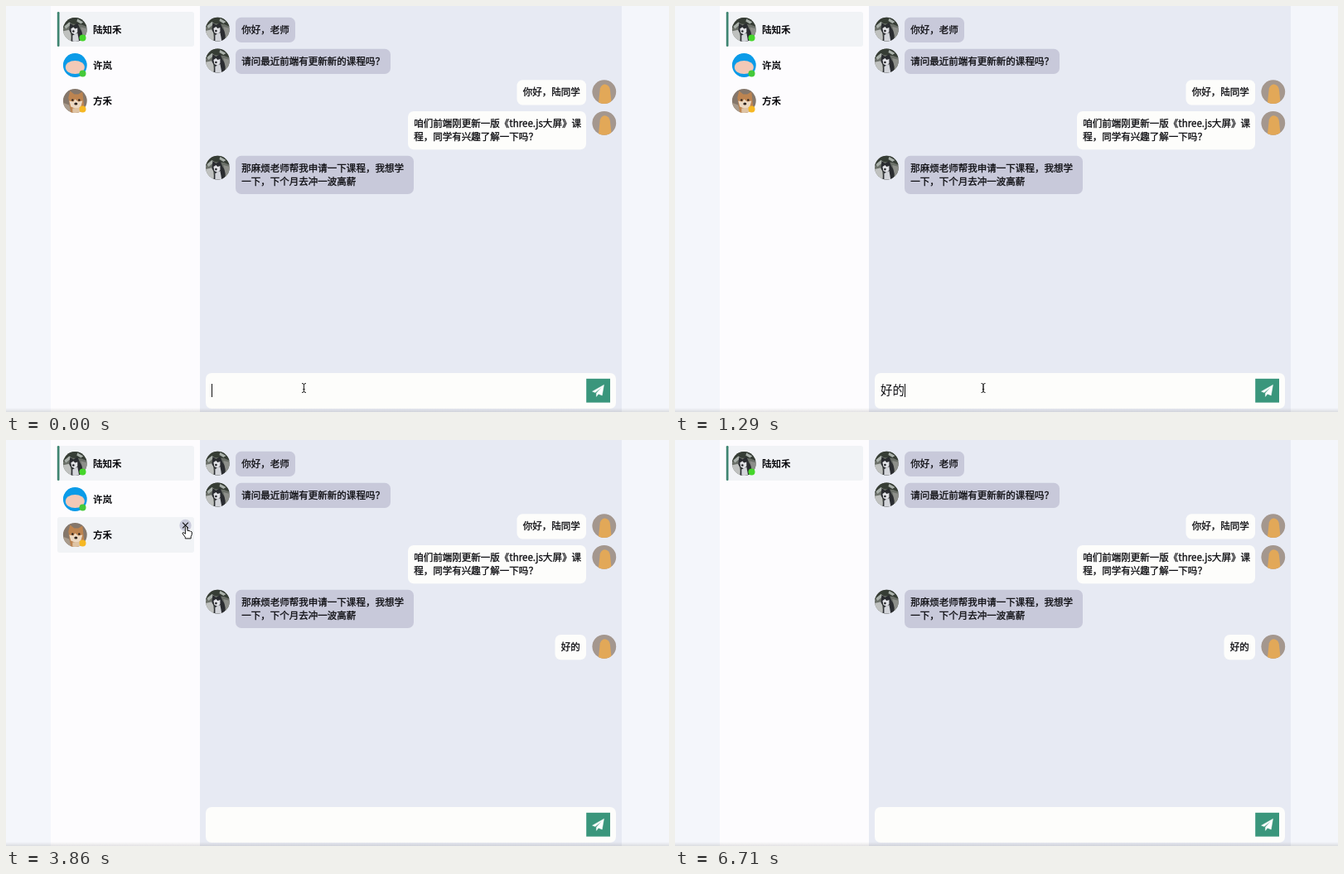
Recreate the animation shown at these times as an HTML page. Size 800 px wide and 490 px high, loop 6.85 s.

```html
<!DOCTYPE html>
<html lang="zh-CN">
<head>
<meta charset="utf-8">
<title>Chat</title>
<style>
html, body { margin: 0; width: 100%; height: 100%; overflow: hidden; background: #f4f6fb; }
svg { display: block; width: 800px; height: 490px; }
text { font: 500 11.52px "Noto Sans CJK SC", "Noto Sans CJK", sans-serif; fill: #0c0c10; white-space: pre; }
.msg { stroke: #0c0c10; stroke-width: .3; }
.name { font-weight: 700; }
#draft { font-family: "Liberation Sans", "Noto Sans CJK SC", sans-serif; font-size: 14.4px; font-weight: 400; }
</style>
</head>
<body>
<svg viewBox="0 0 800 490">
  <defs>
    <clipPath id="disc"><circle r="14.4"/></clipPath>
    <linearGradient id="edge" x2="0" y2="1">
      <stop offset="0" stop-color="#777" stop-opacity="0"/>
      <stop offset="1" stop-color="#777" stop-opacity=".2"/>
    </linearGradient>
    <g id="husky" clip-path="url(#disc)">
      <circle r="15" fill="#6b7069"/>
      <path d="M-15 -15H15V-3L8 -6L-4 -7L-15 -2Z" fill="#363d35"/>
      <path d="M-13 -4L-7 -9L-4 -7L-11 -1ZM3 -13L10 -9L7 -7L2 -10Z" fill="#a9b0aa"/>
      <path d="M-15 2L-6 0L-4 15H-15Z" fill="#bfc1bf"/>
      <path d="M-7 1L-6 -8L-2 -5L3 -8L6 -1L10 5L8 15H-5L-4 6Z" fill="#2a2c30"/>
      <path d="M-5 -1L-2 -3L0 -1L3 -2L3 3L0 6L-4 4Z" fill="#e0e1e5"/>
      <path d="M-3 7L3 4L5 15H-3Z" fill="#d3d5da"/>
      <circle cx="-2" cy="2" r="1.3" fill="#222428"/>
      <path d="M7 -3L15 -1V9L10 11Z" fill="#8d8f8a"/>
    </g>
    <g id="boy" clip-path="url(#disc)">
      <circle r="15" fill="#0b9be8"/>
      <ellipse cy="2.5" rx="11.5" ry="8" fill="#f3c9b7"/>
    </g>
    <g id="shiba" clip-path="url(#disc)">
      <circle r="15" fill="#85776b"/>
      <path d="M-15 2L-7 5L-4 15H-15Z" fill="#a99b8c"/>
      <path d="M-8 -4L-6 -12L-1 -8H4L9 -11L10 -2L12 15H-5Z" fill="#bd8450"/>
      <path d="M-7 0L-2 1L0 -2L4 1L9 0L7 7L2 10L-5 7Z" fill="#ecd9c3"/>
      <path d="M-3 9L8 8L10 15H-3Z" fill="#dfc4a5"/>
      <circle cx="-3" cy="-1" r="1.2" fill="#2b211c"/>
      <circle cx="5" cy="-1" r="1.2" fill="#2b211c"/>
      <ellipse cx="1" cy="3.5" rx="2" ry="1.5" fill="#2b211c"/>
    </g>
    <g id="teacher" clip-path="url(#disc)">
      <circle r="15" fill="#a4978e"/>
      <path d="M-7 15L-5 -4Q-3 -9 1 -9Q6 -8 7 -3L9 15Z" fill="#e2a858"/>
    </g>
  </defs>

  <rect width="800" height="490" fill="#f4f6fb"/>
  <rect x="54" width="180" height="490" fill="#fdfcfe"/>
  <rect x="234" width="509" height="490" fill="#e7eaf3"/>
  <g id="side"></g>
  <g id="chat"></g>
  <rect x="241" y="443" width="495" height="43" rx="7" fill="#fdfdfb"/>
  <text id="draft" x="248" y="469"></text>
  <rect id="line" x="248" y="471" height="1" fill="#111"/>
  <rect id="caret" y="456" width="1" height="16" fill="#111"/>
  <rect x="700.2" y="449.8" width="28.8" height="28.8" fill="#3a967c"/>
  <path d="M721.5 457.2L719.3 470L714.9 468.2L712.4 471.4V467.3L718.9 459.9L710.9 466.6L707.5 465.2Z" fill="#fff" stroke="#fff" stroke-width=".4" stroke-linejoin="round"/>
  <rect y="485" width="800" height="5" fill="url(#edge)"/>

  <g id="pointer">
    <path id="arrow" d="M0 0V9.2L2.1 7.3L3.6 10.6L5.2 9.9L3.8 6.7H6.7Z" fill="#000" stroke="#fff" stroke-width=".9" paint-order="stroke"/>
    <path id="hand" d="M-1.2 .6Q0 -.8 1.1 .6L1.5 5Q2.6 4 3.5 5.4Q4.7 4.6 5.4 6Q6.8 5.6 6.9 7.4Q6.9 10.5 5.6 12.2V14.4H-1.2V12.8L-4.4 8.4Q-4.6 6.8 -3 7.2L-1.1 8.8Z" fill="#fff" stroke="#111" stroke-width="1" stroke-linejoin="round"/>
    <path id="beam" d="M-2.5 -5.5Q0 -5.5 0 -4V4Q0 5.5 -2.5 5.5M2.5 -5.5Q0 -5.5 0 -4V4Q0 5.5 2.5 5.5M-1.2 1.5H1.2" fill="none" stroke="#222" stroke-width="1"/>
  </g>
</svg>
<script>
const LOOP = 6850, FPS = 7, LAST = 47, SENT = 14;
const $ = id => document.getElementById(id);
const show = (el, on) => { el.style.display = on ? '' : 'none'; };

// name, avatar, status colour, step at which the contact is removed
const contacts = [
  ['陆知禾', 'husky', '#45d62b', Infinity],
  ['许岚', 'boy', '#45c93a', 39],
  ['方禾', 'shiba', '#f6b824', 31]
];

// top, from the teacher, width, lines
const messages = [
  [13.8, false, 72, ['你好，老师']],
  [51.7, false, 187, ['请问最近前端有更新新的课程吗？']],
  [89.3, true, 83.5, ['你好，陆同学']],
  [127, true, 215, ['咱们前端刚更新一版《three.js大屏》课', '程，同学有兴趣了解一下吗？']],
  [180.8, false, 215, ['那麻烦老师帮我申请一下课程，我想学', '一下，下个月去冲一波高薪']],
  [235, true, 37.5, ['好的']]
];

const typed = ['', 'h', 'hao', 'hao d', 'hao de', 'hao de'];

// pointer path: step, x, y
const path = [
  [0, 359.5, 461], [9, 372, 461], [10, 560, 458], [11, 735, 458], [12, 714, 463],
  [13, 711, 464.5], [15, 711, 464.5], [16, 655, 450], [17, 540, 372], [19, 262, 140],
  [20, 180, 88], [21, 150, 74.5], [22, 160, 86], [24, 214, 102], [25, 217.5, 104.5],
  [33, 217.5, 104.5], [34, 217, 96], [37, 217, 62], [38, 216.5, 60.5], [47, 216.5, 60.5]
];

const rowTop = i => 7 + 43 * i;
const avatar = (id, x, y) => `<use href="#${id}" transform="translate(${x} ${y})"/>`;

$('side').innerHTML = contacts.map(([name, pic, dot], i) => {
  const y = rowTop(i), mid = y + 21.5;
  return `<g>
    <rect class="back" x="62" y="${y}" width="165" height="${i ? 43 : 42}" rx="3" fill="#f1f3f6"/>
    ${i ? '' : `<rect x="61.8" y="${y}" width="2.7" height="42" rx="1.3" fill="#3f8571"/>`}
    ${avatar(pic, 83.3, mid)}
    <circle cx="92.5" cy="${mid + 10}" r="4" fill="${dot}"/>
    <text class="name" x="105" y="${mid + 4.2}">${name}</text>
    <g class="close" transform="translate(216.5 ${y + 10})">
      <circle r="7.2" fill="#c9cadb"/>
      <path d="M-3.4 -3.4L3.4 3.4M3.4 -3.4L-3.4 3.4" stroke="#111" stroke-width="1.1"/>
    </g>
  </g>`;
}).join('');

$('chat').innerHTML = messages.map(([y, mine, w, lines]) => {
  const x = mine ? 700 - w : 277, h = 14.3 + 16 * lines.length;
  return `<g>
    ${avatar(mine ? 'teacher' : 'husky', mine ? 721.8 : 255.4, y + 14.3)}
    <rect x="${x}" y="${y}" width="${w}" height="${h}" rx="7" fill="${mine ? '#fdfdfb' : '#c8c9da'}"/>
    ${lines.map((s, i) => `<text class="msg" x="${x + 7.2}" y="${y + 19.1 + 16 * i}">${s}</text>`).join('')}
  </g>`;
}).join('');

const rows = [...$('side').children];
const reply = $('chat').lastElementChild;

function pointerAt(n) {
  const i = Math.max(1, path.findIndex(p => p[0] >= n));
  const [a, b] = [path[i - 1], path[i]];
  const k = (n - a[0]) / (b[0] - a[0]);
  return [a[1] + (b[1] - a[1]) * k, a[2] + (b[2] - a[2]) * k];
}

function draw(ms) {
  const n = Math.min(LAST, Math.floor((ms + 5) * FPS / 1000));
  const [x, y] = pointerAt(n);
  const seen = n === 0 || (n > 8 && n < 46);

  let hand = x > 700 && x < 729 && y > 450 && y < 479;
  rows.forEach((row, i) => {
    const top = rowTop(i), alive = n < contacts[i][3];
    const hover = alive && seen && x > 62 && x < 227 && y >= top && y < top + 43;
    show(row, alive);
    show(row.querySelector('.back'), i === 0 || hover);
    show(row.querySelector('.close'), hover);
    if (hover && Math.hypot(x - 216.5, y - top - 10) < 7.2) hand = true;
  });
  const beam = !hand && y > 443 && x > 241 && x < 700;

  show($('pointer'), seen);
  $('pointer').setAttribute('transform', `translate(${x} ${y})`);
  show($('hand'), hand);
  show($('beam'), beam);
  show($('arrow'), !hand && !beam);

  const draft = n >= SENT ? '' : typed[n] ?? '好的';
  $('draft').textContent = draft;
  const w = draft ? $('draft').getComputedTextLength() : 0;
  $('line').setAttribute('width', n < typed.length ? w : 0);
  $('caret').setAttribute('x', 248 + Math.round(w));
  show($('caret'), n < SENT - 1);
  show(reply, n >= SENT);
}

const start = performance.now();
function tick() {
  draw((performance.now() - start) % LOOP);
  requestAnimationFrame(tick);
}
tick();
</script>
</body>
</html>
```
